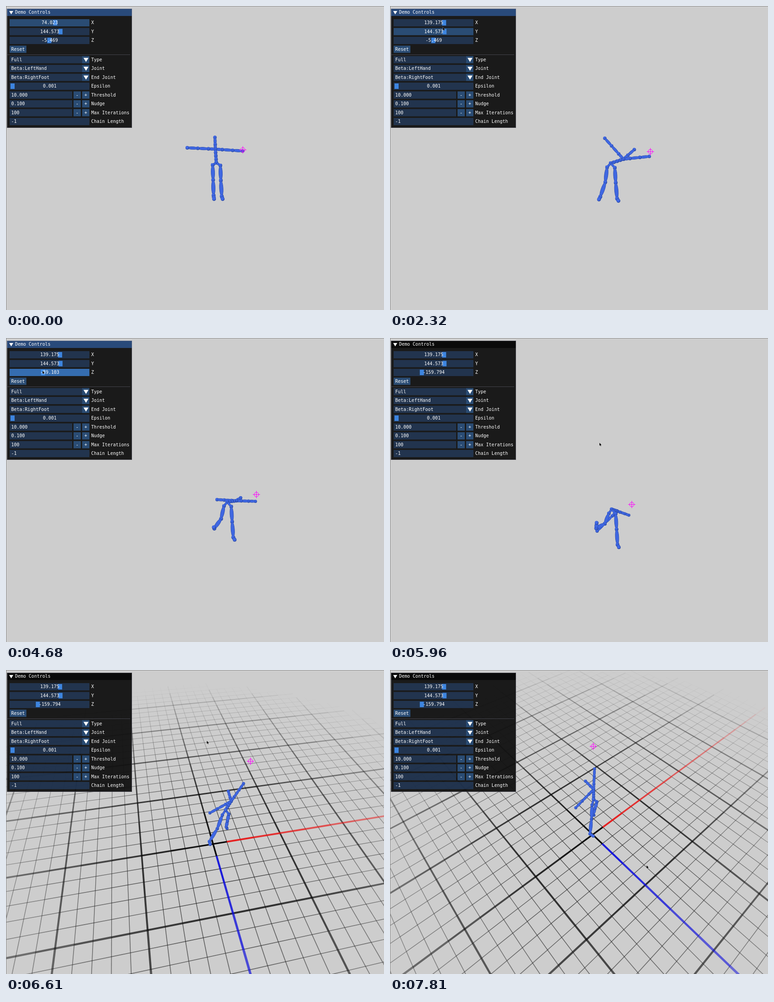
Recreate the animation shown at these times as an HTML page with a canvas. Size 834x671 px, loop 8 s.

```html
<!DOCTYPE html>
<html lang="en">
<head>
<meta charset="utf-8">
<title>Demo Controls</title>
<style>
html, body { margin: 0; width: 100%; height: 100%; overflow: hidden; background: #cdcdcd; }
canvas { display: block; }
</style>
</head>
<body>
<canvas id="stage" width="834" height="671"></canvas>
<script>
const W = 834, H = 671, LOOP = 8000;
const FOCAL = H / 2 / Math.tan(Math.PI / 6);
const CENTER = [-52, 111, 0], DISTANCE = 650;
const ctx = document.getElementById('stage').getContext('2d');

// ---- Timing: bursts of [first change, last change, number of changes] ----
const BURSTS = [
  [740, 1470, 9], [1580, 1670, 2], [1840, 2590, 9], [2670, 2770, 2], [3090, 3570, 6], [3840, 4580, 9],
  [4680, 5390, 9], [5490, 5770, 4], [5960, 6690, 9], [6770, 7530, 9], [7620, 7810, 3]
];

// Time of the latest picture change at or before t.
function hold(t) {
  let held = 0;
  for (const [start, end, count] of BURSTS) {
    if (t < start) break;
    const gap = (end - start) / (count - 1);
    held = start + gap * Math.min(count - 1, Math.floor((t - start) / gap + 0.12));
  }
  return held;
}

const mix = (a, b, u) => a + (b - a) * u;

// Linear keyframes: [time, value, value, ...]
function track(keys, t) {
  const i = keys.findIndex(key => key[0] > t);
  if (i === 0) return keys[0].slice(1);
  if (i < 0) return keys[keys.length - 1].slice(1);
  const a = keys[i - 1], b = keys[i], u = (t - a[0]) / (b[0] - a[0]);
  return a.slice(1).map((v, n) => mix(v, b[n + 1], u));
}

const TARGET_X = [[740, 74.023], [1378, 128.866], [1580, 139.175]];
const TARGET_Y = 144.573;
const TARGET_Z = [[3840, -5.469], [5390, -159.794]];
const POSE = [[740, 0], [1378, 1], [1670, 2], [3840, 2], [5580, 3]];
const ORBIT = [[5960, 8.2, -24.2], [6598, 11, 51], [7055, 35.9, 55.1], [7530, 40.4, 54.8]];
const CURSOR = [
  [740, 108, 36], [1378, 118, 36], [1840, 119, 36], [2590, 115, 53], [2770, 113, 58], [3090, 113, 58],
  [3378, 94, 70], [3840, 94, 72], [5390, 69, 72], [5490, 69, 72], [5770, 462, 231], [5960, 462, 231],
  [6598, 443, 156], [7055, 394, 152], [7530, 392, 152], [7810, 566, 431]
];

// ---- Camera orbiting CENTER ----
const dot = (a, b) => a[0] * b[0] + a[1] * b[1] + a[2] * b[2];

function orbitCamera(yawDegrees, pitchDegrees) {
  const yaw = yawDegrees * Math.PI / 180, pitch = pitchDegrees * Math.PI / 180;
  const c = Math.cos(yaw), s = Math.sin(yaw), cp = Math.cos(pitch), sp = Math.sin(pitch);
  const right = [c, 0, s], up = [s * sp, cp, -c * sp], ahead = [s * cp, -sp, -c * cp];
  const eye = CENTER.map((v, i) => v - DISTANCE * ahead[i]);
  return {
    eye,
    project(p) {
      const rel = p.map((v, i) => v - eye[i]);
      const depth = dot(ahead, rel), scale = FOCAL / depth;
      return { x: W / 2 + scale * dot(right, rel), y: H / 2 - scale * dot(up, rel), depth, scale };
    },
    // World point seen at (x, y) on the plane of constant z.
    unproject(x, y, z) {
      const u = (x - W / 2) / FOCAL, v = (H / 2 - y) / FOCAL;
      const ray = ahead.map((f, i) => f + u * right[i] + v * up[i]);
      const reach = (z - eye[2]) / ray[2];
      return eye.map((e, i) => e + reach * ray[i]);
    }
  };
}

// ---- Ground grid ----
const CELL = 40, MAJOR = 5, REACH = 1000;

function gridLine(camera, n, alongX, strength) {
  const major = n % MAJOR === 0, side = n * CELL;
  for (let a = -REACH; a < REACH; a += 80) {
    const mid = Math.hypot(a + 40, side);
    if (mid >= REACH) continue;
    const [p, q] = [a, a + 80].map(v => camera.project(alongX ? [v, 0, side] : [side, 0, v]));
    if (p.depth < 50 || q.depth < 50) continue;
    const axis = n === 0 && a >= 0;
    ctx.strokeStyle = axis ? (alongX ? '#e81414' : '#0c0cdc') : major ? '#080808' : '#1c1c1c';
    ctx.globalAlpha = strength * (1 - mid / REACH) * (major ? 1 : 0.85);
    ctx.lineWidth = (p.scale + q.scale) / 2 * (axis ? 5 : major ? 4.4 : 1.6);
    ctx.beginPath();
    ctx.moveTo(p.x, p.y);
    ctx.lineTo(q.x, q.y);
    ctx.stroke();
  }
}

function drawGrid(camera) {
  const strength = Math.min(1, camera.eye[1] / 200);
  if (strength <= 0) return; // the ground shows from above only
  const last = REACH / CELL;
  for (const wanted of [false, true])
    for (let n = -last; n <= last; n++)
      if ((n % MAJOR === 0) === wanted)
        for (const alongX of [true, false]) if (n) gridLine(camera, n, alongX, strength);
  gridLine(camera, 0, true, strength);
  gridLine(camera, 0, false, strength);
  ctx.globalAlpha = 1;
}

// ---- Figure: joints placed as seen from the opening camera, plus depth ----
// pelvis, chest, head, hands (R, L), then hip, knee, ankle, toe (R, L)
const POSES = [
  [464,346, 462,316, 461,290, 400,313, 522,320, 456,351, 457,384, 458,418, 459,426, 473,352, 474,385, 476,420, 478,426],
  [478,344, 506,335, 529,313, 463,290, 561,327, 469,353, 467,386, 460,420, 459,426, 487,354, 488,387, 491,422, 493,429],
  [487,347, 515,338, 539,317, 474,292, 572,332, 479,356, 475,389, 464,421, 461,427, 496,357, 498,390, 501,425, 504,430],
  [489,378, 501,382, 495,391, 457,426, 527,391, 483,387, 474,410, 455,420, 456,408, 498,388, 500,422, 502,456, 505,462]
];
const FINAL_DEPTH = [-48, -72, -110, -87, -125, -43, -25, 0, 15, -43, -50, -58, -57];
// [from, to, inner joints, half width]
const LIMBS = [
  [0, 1, [0.25, 0.5, 0.75], 3.2], [1, 2, [0.4], 3.4], [1, 3, [0.25, 0.63], 3.4], [1, 4, [0.25, 0.63], 3.4],
  [0, 5, [], 2.6], [5, 6, [], 4.4], [6, 7, [], 4.4], [7, 8, [], 4],
  [0, 9, [], 2.6], [9, 10, [], 4.4], [10, 11, [], 4.4], [11, 12, [], 4]
];
const openingCamera = orbitCamera(8.2, -24.2);

function figureJoints(pose) {
  const i = Math.min(2, Math.floor(pose)), u = pose - i;
  const from = POSES[i], to = POSES[i + 1], sink = Math.max(0, pose - 2);
  return FINAL_DEPTH.map((z, j) => openingCamera.unproject(
    mix(from[2 * j], to[2 * j], u), mix(from[2 * j + 1], to[2 * j + 1], u), z * sink));
}

function disc(x, y, r, color) {
  ctx.fillStyle = color;
  ctx.beginPath();
  ctx.arc(x, y, r, 0, 7);
  ctx.fill();
}

function drawBall({ x, y, scale }) {
  const r = 4.5 * scale;
  disc(x, y, r, '#2c4baa');
  disc(x - 0.12 * r, y - 0.17 * r, r * 0.8, '#4169e6');
}

function drawSpindle(p, q, halfWidth) {
  ctx.beginPath();
  ctx.ellipse((p.x + q.x) / 2, (p.y + q.y) / 2, Math.hypot(q.x - p.x, q.y - p.y) / 2,
    halfWidth * p.scale, Math.atan2(q.y - p.y, q.x - p.x), 0, 7);
  ctx.fillStyle = '#3f67e2';
  ctx.fill();
  ctx.strokeStyle = '#2f50b4';
  ctx.lineWidth = 1;
  ctx.stroke();
}

function drawFigure(camera, pose) {
  const joints = figureJoints(pose), parts = [];
  for (const [from, to, inner, halfWidth] of LIMBS) {
    const points = [0, ...inner, 1].map(u =>
      camera.project(joints[from].map((v, i) => mix(v, joints[to][i], u))));
    points.forEach((p, i) => {
      parts.push({ depth: p.depth, draw: () => drawBall(p) });
      const q = points[i + 1];
      if (q) parts.push({ depth: (p.depth + q.depth) / 2, draw: () => drawSpindle(p, q, halfWidth) });
    });
  }
  parts.sort((a, b) => b.depth - a.depth).forEach(part => part.draw());
}

function drawTarget(camera, position) {
  const p = camera.project(position);
  const x = Math.floor(p.x) + 0.5, y = Math.floor(p.y) + 0.5;
  ctx.strokeStyle = '#ff00ff';
  ctx.lineWidth = 1;
  ctx.beginPath();
  ctx.moveTo(x - 8, y);
  ctx.lineTo(x + 8, y);
  ctx.moveTo(x, y - 8);
  ctx.lineTo(x, y + 8);
  ctx.moveTo(x + 5, y);
  ctx.arc(x, y, 5, 0, 7);
  ctx.stroke();
}

// ---- Control panel ----
const COLORS = {
  idle: 'rgba(41,74,122,.54)', hover: 'rgba(66,150,250,.4)', active: 'rgba(66,150,250,.67)',
  button: 'rgba(66,150,250,.4)', grab: '#3d85e0', grabActive: '#4296fa'
};

function box(x, y, w, h, color) {
  ctx.fillStyle = color;
  ctx.fillRect(x, y, w, h);
}

function polygon(color, ...points) {
  ctx.fillStyle = color;
  ctx.beginPath();
  points.forEach(([x, y]) => ctx.lineTo(x, y));
  ctx.closePath();
  ctx.fill();
}

function label(text, x, y, align = 'left') {
  ctx.fillStyle = '#fff';
  ctx.textAlign = align;
  ctx.fillText(text, x, y + 8.5);
}

function button(text, x, y, w) {
  box(x, y, w, 16, COLORS.button);
  label(text, x + w / 2, y, 'center');
}

function field(y, name, state = 'idle', w = 176) {
  box(8, y, w, 16, COLORS[state]);
  label(name, 188, y);
}

function slider(y, name, value, grabX, state) {
  field(y, name, state);
  box(grabX - 4.5, y + 2, 9, 12, state === 'active' ? COLORS.grabActive : COLORS.grab);
  label(value.toFixed(3), 96.5, y, 'center');
}

function combo(y, name, value) {
  field(y, name, 'idle', 160);
  box(168, y, 16, 16, COLORS.button);
  polygon('#fff', [171, y + 4], [182, y + 4], [176.5, y + 13]);
  label(value, 11.5, y);
}

function stepper(y, name, value) {
  field(y, name, 'idle', 138);
  label(value, 11.5, y);
  button('-', 149, y, 16);
  button('+', 168, y, 16);
}

function sliderStates(t) {
  const states = { x: 'idle', y: 'idle', z: 'idle' };
  if (t < 740) states.x = 'hover';
  else if (t < 1840) states.x = 'active';
  else if (t < 2200) states.x = 'hover';
  else if (t < 3280) states.y = 'hover';
  else if (t >= 3460 && t < 5490) states.z = t < 3840 ? 'hover' : 'active';
  return states;
}

function drawPanel(t, x, z) {
  box(2, 6, 276, 263, 'rgba(15,15,15,.94)');
  box(2, 6, 276, 16, t < 5960 ? '#294a7a' : '#0a0a0a');
  ctx.strokeStyle = 'rgba(110,110,128,.5)';
  ctx.lineWidth = 1;
  ctx.strokeRect(2.5, 6.5, 275, 262);
  box(3, 107, 271, 1, 'rgba(110,110,128,.5)');
  ctx.font = '10px "DejaVu Sans Mono", monospace';
  ctx.textBaseline = 'middle';

  polygon('#fff', [7, 11], [16, 11], [11.5, 18.5]);
  label('Demo Controls', 20, 6);
  const states = sliderStates(t), grab = value => 96.5 + 0.164 * value;
  slider(29, 'X', x, grab(x), states.x);
  slider(48.5, 'Y', TARGET_Y, grab(TARGET_Y), states.y);
  slider(68, 'Z', z, grab(z), states.z);
  button('Reset', 8, 87.5, 37);
  combo(110.5, 'Type', 'Full');
  combo(130, 'Joint', 'Beta:LeftHand');
  combo(149.5, 'End Joint', 'Beta:RightFoot');
  slider(169, 'Epsilon', 0.001, 14.5, 'idle');
  stepper(188.5, 'Threshold', '10.000');
  stepper(208, 'Nudge', '0.100');
  stepper(227.5, 'Max Iterations', '100');
  field(247, 'Chain Length');
  label('-1', 11.5, 247);
}

function drawCursor(x, y) {
  const outline = [[0, 0], [0, 7], [1.6, 5.8], [2.8, 8], [4, 7.4], [3, 5.2], [5, 5]];
  const points = outline.map(([dx, dy]) => [x + dx, y + dy]);
  polygon('#000', ...points);
  ctx.strokeStyle = 'rgba(255,255,255,.6)';
  ctx.lineWidth = 0.5;
  ctx.stroke();
}

function draw(t) {
  const camera = orbitCamera(...track(ORBIT, t));
  const lagged = t - 85; // the scene trails the sliders by one step
  box(0, 0, W, H, '#cdcdcd');
  drawGrid(camera);
  drawFigure(camera, track(POSE, t)[0]);
  drawTarget(camera, [track(TARGET_X, lagged)[0], TARGET_Y, track(TARGET_Z, lagged)[0]]);
  box(0, 0, W, 1, '#8c8c8c');
  box(0, 0, 1, H, '#8c8c8c');
  drawPanel(t, track(TARGET_X, t)[0], track(TARGET_Z, t)[0]);
  if (t >= 740) drawCursor(...track(CURSOR, t));
}

function tick() {
  draw(hold(performance.now() % LOOP));
  requestAnimationFrame(tick);
}
tick();
</script>
</body>
</html>
```
